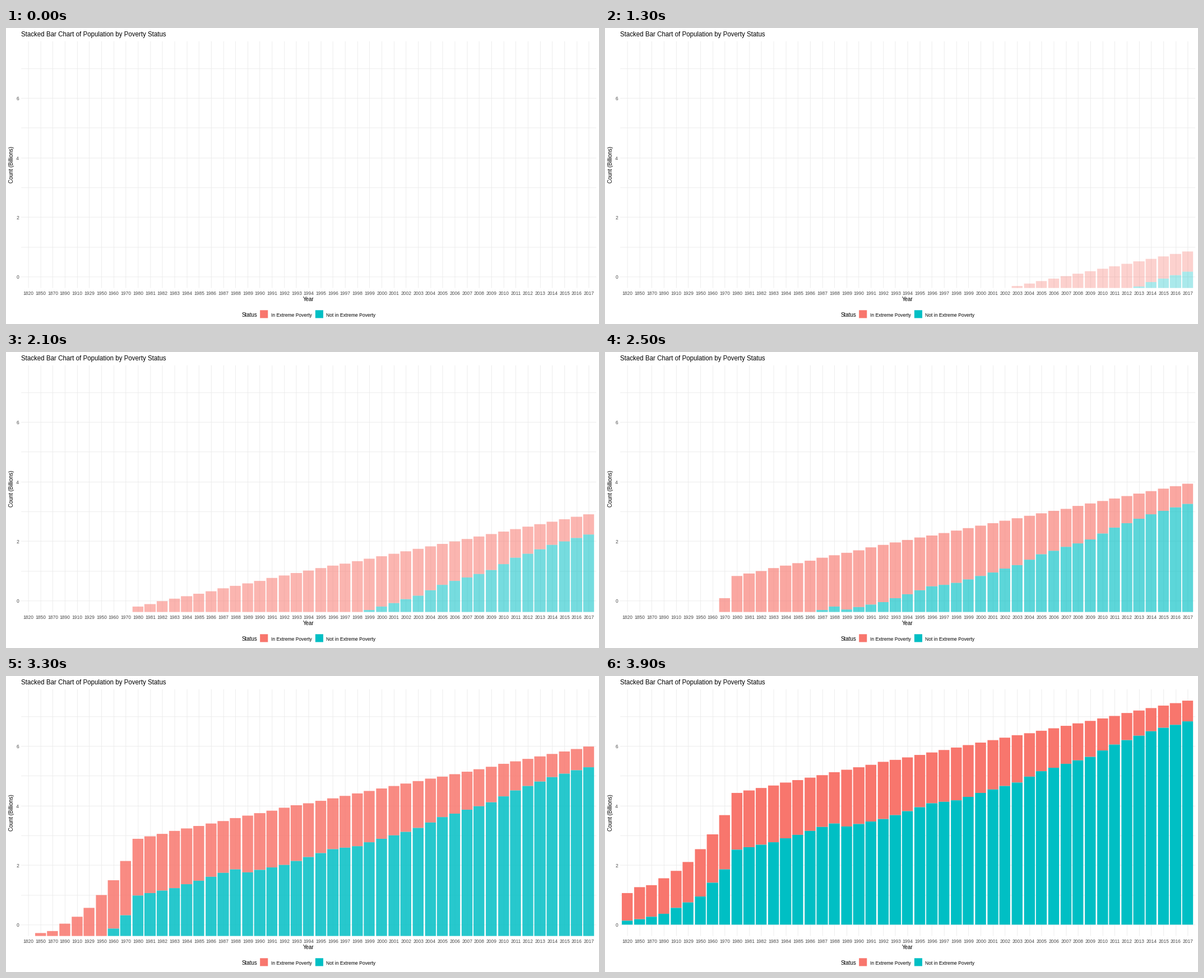
A matplotlib script that plays this animation: 1058x529 px, repeating every 8000 ms.

```python
import numpy as np
import matplotlib.pyplot as plt
from matplotlib.animation import FuncAnimation
from matplotlib.patches import Rectangle

W, H, DPI = 1058, 529, 64
UNITS = 1200             # the layout is 1200 x 600 units
STEP_MS, FRAMES = 100, 80
RISE = 39                # steps until the bars stand on the zero line
DRIFT = 10               # starting depth in billions
ZERO, UNIT = 504.6, 60.37
LEFT, RIGHT, TOP, BOTTOM = 30.7, 1194.5, 27, 527
PITCH = (RIGHT - LEFT) / 47.2
PINK, TEAL, GRID, GREY = "#F8766D", "#00BFC4", "#EBEBEB", "#4D4D4D"

years = [1820, 1850, 1870, 1890, 1910, 1929, 1950, 1960, 1970, *range(1980, 2018)]
centers = LEFT + PITCH * (0.6 + np.arange(len(years)))


def trend(*points):
    """Straight lines between (year, billions) points, read at every year."""
    return np.interp(years, *zip(*points))


total = trend((1820, 1.06), (1850, 1.26), (1870, 1.32), (1910, 1.81),
              (1929, 2.11), (1950, 2.53), (1960, 3.03), (1970, 3.68),
              (1980, 4.42), (1992, 5.46), (2007, 6.68), (2017, 7.52))
not_poor = trend((1820, 0.13), (1850, 0.18), (1890, 0.36), (1950, 0.95),
                 (1970, 1.86), (1980, 2.52), (1983, 2.77), (1988, 3.40),
                 (1989, 3.29), (1992, 3.54), (1996, 4.07), (1998, 4.18),
                 (2003, 4.78), (2005, 5.15), (2009, 5.64), (2011, 6.05),
                 (2014, 6.49), (2017, 6.83))

plt.rcParams["font.family"] = "Liberation Sans"
fig = plt.figure(figsize=(W / DPI, H / DPI), dpi=DPI, facecolor="white")
ax = fig.add_axes([0, 0, 1, 1])
ax.set_xlim(0, UNITS)
ax.set_ylim(UNITS * H / W, 0)
ax.axis("off")


def rect(x, y, w, h, color, z=1):
    return ax.add_patch(Rectangle((x, y), w, h, fc=color, lw=0, zorder=z, snap=False))


def label(x, y, text, size, color="black", ha="left", rotation=0):
    ax.text(x, y, text, size=size * W / UNITS * 72 / DPI, color=color, ha=ha,
            va="baseline", rotation=rotation, rotation_mode="anchor")


def row(value):
    return np.floor(ZERO - UNIT * value)


# Grid
for v in range(8):
    rect(LEFT, row(v), RIGHT - LEFT, 1, GRID)
for x in centers:
    rect(np.floor(x), TOP, 1, BOTTOM - TOP, GRID)

# Labels
label(31, 17, "Stacked Bar Chart of Population by Poverty Status", 13.1)
for x, year in zip(centers, years):
    label(x, 540.5, str(year), 9.7, GREY, "center")
for v in range(0, 8, 2):
    label(26, row(v) + 4.5, str(v), 9.7, GREY, "right")
label(612.5, 554, "Year", 11.1, ha="center")
label(15.2, 277.3, "Count (Billions)", 11.1, ha="center", rotation=90)

# Legend
label(476.7, 585.3, "Status", 11.1)
for x, color, name in ((514, PINK, "In Extreme Poverty"),
                       (626, TEAL, "Not in Extreme Poverty")):
    rect(x, 572, 16, 16, color)
    label(x + 22, 585.3, name, 9.7)


def bar_row(color):
    edges = np.floor([centers - 0.45 * PITCH, centers + 0.45 * PITCH])
    return [rect(a, BOTTOM, b - a, 0, color, 2) for a, b in edges.T]


pink_bars, teal_bars = bar_row(PINK), bar_row(TEAL)


def place(bars, tops, bottoms, alpha):
    for bar, top, bottom in zip(bars, tops, bottoms):
        bar.set_y(top)
        bar.set_height(bottom - top)
        bar.set_alpha(alpha)
        bar.set_visible(bottom > top)


def draw(i):
    p = min(i / RISE, 1)
    drop = DRIFT * (1 - p)
    tops, splits, feet = (np.minimum(row(v - drop), BOTTOM)
                          for v in (total, not_poor, 0 * total))
    place(pink_bars, tops, splits, p)
    place(teal_bars, splits, feet, p)
    return pink_bars + teal_bars


anim = FuncAnimation(fig, draw, frames=FRAMES, init_func=lambda: draw(0),
                     interval=STEP_MS, repeat=True, repeat_delay=0, blit=False)
plt.show()
```
